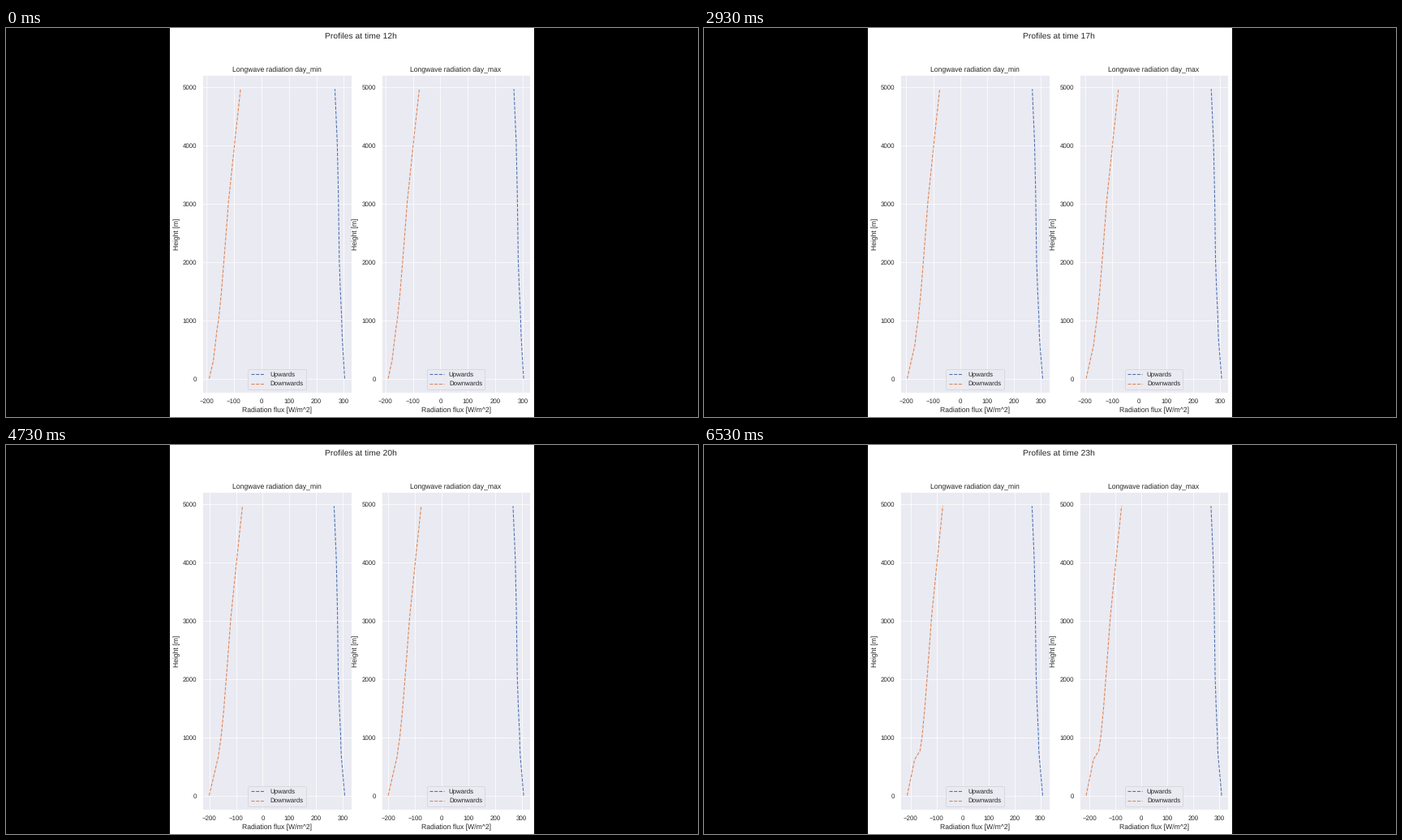
These frames come from a looping animation (853 px wide and 480 px high, 7130 ms). A matplotlib script:

```python
import numpy as np
import matplotlib.pyplot as plt
from matplotlib.animation import FuncAnimation
from matplotlib.patches import Rectangle

W, H, DPI = 853, 480, 64
LOOP, STEP = 7130, 46
FIRST_HOLD, HOLD = 530, 600
S = 0.81  # scale of all point sizes
INK, PLOT_BG = "#262626", "#EAEAF2"
BLUE, ORANGE = "#4C72B0", "#DD8452"

plt.rcParams.update({
    "font.family": "Liberation Sans", "text.hinting": "none",
    "text.color": INK, "axes.labelcolor": INK,
    "xtick.color": INK, "ytick.color": INK,
    "axes.facecolor": PLOT_BG, "axes.edgecolor": "white",
    "axes.linewidth": 1.25 * S, "axes.axisbelow": True,
    "axes.grid": True, "grid.color": "white", "grid.linewidth": S,
    "axes.titlesize": 12 * S, "axes.titlepad": 6 * S,
    "axes.labelsize": 12 * S, "axes.labelpad": 4 * S,
    "xtick.labelsize": 11 * S, "ytick.labelsize": 11 * S,
    "legend.fontsize": 11 * S, "lines.linewidth": 1.5 * S,
    "patch.linewidth": S,
})

# Height [m] and flux of the undisturbed air above the surface layer
LEVELS = [300, 500, 770, 1000, 1430, 2000, 3000, 4000, 4970]
DOWN = [-175, -169.8, -163.5, -156, -146.5, -136.5, -120.5, -98.5, -75.8]
UP = [299, 296.8, 293.5, 292.5, 288, 283.5, 280.8, 276.5, 267.5]

# Hourly change of the surface layer, 12h to 23h
LAYER_TOP = [300, 350, 410, 450, 500, 570, 600, 620, 680, 730, 750, 770]
DOWN_GROUND = [-190, -191.5, -192.7, -194, -195, -196.5,
               -198, -199.2, -200.5, -202, -206, -213]
NOTCH = [0] * 10 + [4, 11]


def profile(base, top, ground, notch=0):
    """Follow the base curve down to the layer top, then run to the ground."""
    z = np.unique(np.append(np.arange(0, 4970, 35), [top, 620, 4970]))
    edge = np.interp(top, LEVELS, base)
    layer = np.interp(z, [0, 620, top] if notch else [0, top],
                      [ground, ground + (edge - ground) * 620 / top - notch, edge]
                      if notch else [ground, edge])
    return np.where(z < top, layer, np.interp(z, LEVELS, base)), z


fig = plt.figure(figsize=(W / DPI, H / DPI), dpi=DPI, facecolor="black")
fig.add_artist(Rectangle((202 / W, 0), 449 / W, 1, fc="white", lw=0, zorder=-1))
heading = fig.text(437.2 / W, 1 - 13.2 / H, "", ha="center", size=14.4 * S)


def make_panel(left, title):
    ax = fig.add_axes([left / W, 1 - 450.2 / H, 183.7 / W, 392.2 / H])
    ax.set_title(title)
    ax.set_xlabel("Radiation flux [W/m^2]")
    ax.set_ylabel("Height [m]")
    ax.tick_params(length=0, pad=9.5 * S)
    ax.set_xticks(range(-200, 301, 100))
    ax.set_yticks(range(0, 5001, 1000))
    ax.set_ylim(-245, 5212)
    up, = ax.plot([], [], "--", color=BLUE, label="Upwards")
    down, = ax.plot([], [], "--", color=ORANGE, label="Downwards")
    ax.legend(loc="lower center", handlelength=2.2)
    return ax, up, down


panels = [make_panel(242.1, "Longwave radiation day_min"),
          make_panel(462.7, "Longwave radiation day_max")]


def update(frame):
    end = (frame + 1) * STEP - 1
    hour = 0 if end < FIRST_HOLD else 1 + (end - FIRST_HOLD) // HOLD
    hour = min(hour, 11)
    heading.set_text(f"Profiles at time {12 + hour}h")
    top = LAYER_TOP[hour]
    up_ground = np.interp(hour, [0, 2, 11], [303, 304.8, 308.4])
    low = DOWN_GROUND[hour]
    margin = 0.05 * (up_ground - low)
    for i, (ax, up, down) in enumerate(panels):
        up.set_data(*profile(UP, top, up_ground))
        down.set_data(*profile(np.array(DOWN) - 0.8 * i, top, low, NOTCH[hour]))
        ax.set_xlim(low - margin, up_ground + margin)
    return [heading]


anim = FuncAnimation(fig, update, frames=LOOP // STEP, interval=STEP,
                     init_func=lambda: update(0), repeat=True, repeat_delay=0)
plt.show()
```
